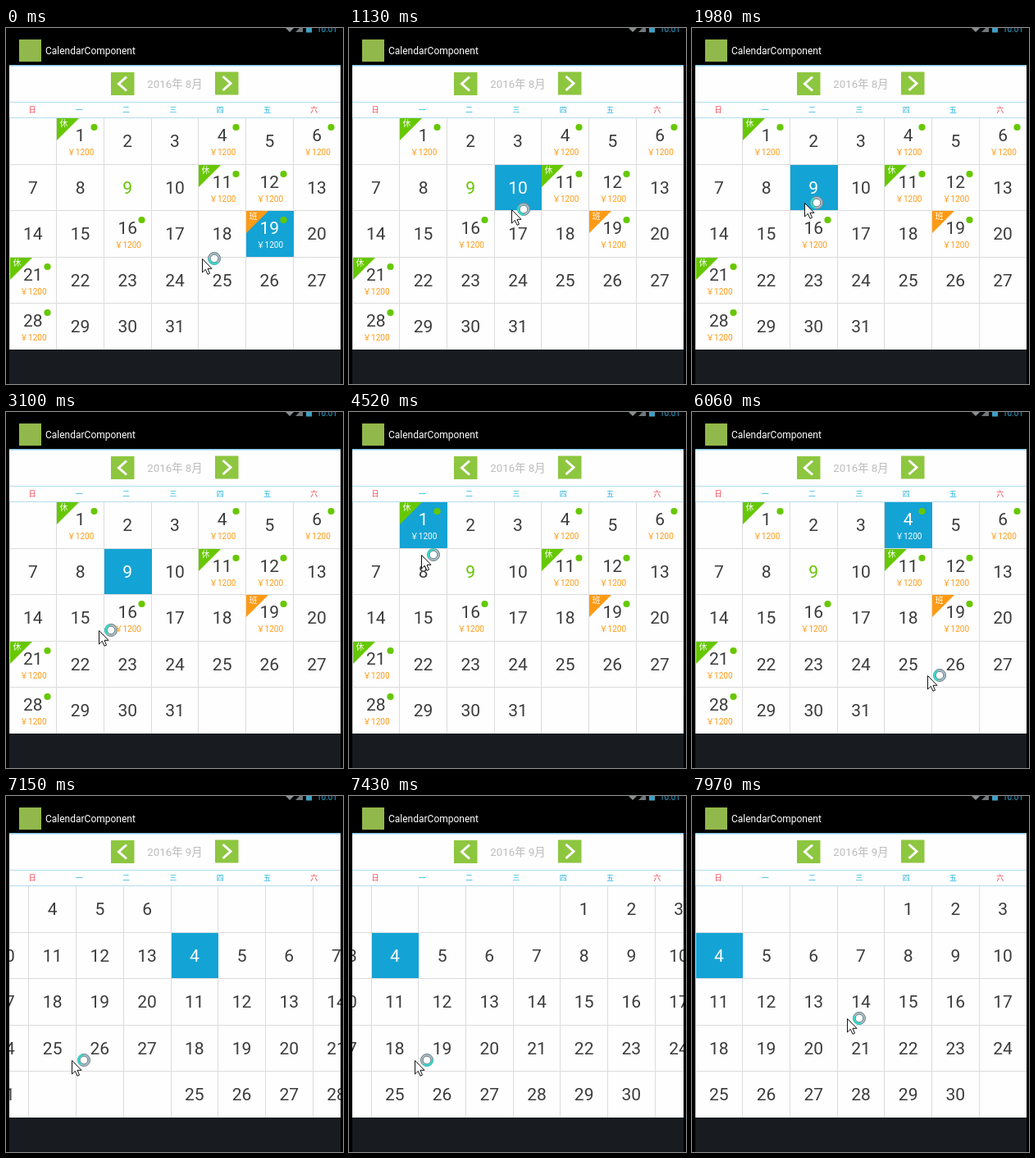
Write an HTML page that moves like this. It is 411 by 434 pixels and loops after 8000 ms.

```html
<!DOCTYPE html>
<html lang="zh">
<head>
<meta charset="utf-8">
<title>Calendar</title>
<style>
  html, body { margin: 0; width: 100%; height: 100%; overflow: hidden; background: #000; }
  svg { display: block; width: 411px; height: 434px; font-family: Roboto, "Noto Sans CJK SC", "Noto Sans CJK", sans-serif; }
  .mid { text-anchor: middle; }
  .line { stroke: #dcdcdc; fill: none; }
  .bg { fill: none; }
  .num { font-size: 21px; fill: #3c3c3c; }
  .price { font-size: 10px; fill: #ff9a14; }
  .tag { font-size: 10px; font-weight: 500; fill: #fff; }
  .today .num { fill: #66c400; }
  .marked .num { transform: translateY(-7px); }
  .plain .num { transform: none; }
  .plain .mark { display: none; }
  .sel .bg { fill: #14a3d5; }
  .sel .num, .sel .price { fill: #fff; }
</style>
</head>
<body>
<svg id="stage" viewBox="0 0 411 434">
  <defs><clipPath id="view"><rect x="4" y="109" width="404" height="283"/></clipPath></defs>
  <rect width="411" height="434"/>
  <rect x="4" y="392" width="404" height="42" fill="#181c20"/>
  <rect x="4" y="46" width="404" height="346" fill="#fefefe"/>
  <rect x="4" y="45" width="404" height="1.5" fill="#86cbea"/>

  <g id="status">
    <path d="M341 0H351L346 5Z" fill="#8a8f92"/>
    <path d="M353 5L358 0H362V5Z" fill="#70767a"/>
    <rect x="366" width="7" height="5.5" fill="#3f9fc4"/>
    <text x="379" y="4.5" font-size="10" fill="#33a5d3">10:01</text>
  </g>
  <rect x="16" y="14" width="27" height="27" fill="#91b84b"/>
  <text x="48" y="32" font-size="12" fill="#fff">CalendarComponent</text>

  <g fill="#8dc63f">
    <rect x="128" y="54" width="28.5" height="28"/>
    <rect x="255" y="53.5" width="28.5" height="28"/>
  </g>
  <path d="M147 59.5L137.5 68L147 76.5M264.5 59L274 67.5L264.5 76" fill="none" stroke="#fff" stroke-width="3"/>
  <text id="month" class="mid" x="206" y="73" font-size="13.3" fill="#bcbcbc"></text>
  <path d="M4 90.5H408" stroke="#b5dcf0"/>
  <g id="week" class="mid" font-size="9"></g>

  <g clip-path="url(#view)">
    <g id="aug"></g>
    <g id="sep"></g>
  </g>
  <path d="M4 109.5H408" stroke="#b5dcf0"/>

  <g id="cursor">
    <path d="M.5 .5V17L4.300 13.300L7 19.300L9.500 18.200L7 12.300H12Z" fill="#fff" stroke="#111"/>
    <g transform="translate(15 0)">
      <circle r="6.300" fill="#fff" stroke="#a9bfc7" stroke-width="3.200"/>
      <circle r="7.500" fill="none" stroke="#66757c" stroke-width=".8"/>
      <circle r="4.800" fill="none" stroke="#586970" stroke-width=".8"/>
      <path id="glow" d="M-6.300 0A6.300 6.300 0 0 0 4.500 4.500" fill="none" stroke="#35d6c8" stroke-width="2.600"/>
    </g>
  </g>
</svg>
<script>
const $ = id => document.getElementById(id);
const LOOP = 8000, PAGE = 404;
const colX = c => 4 + Math.floor(c * 57.7);
const rowY = r => Math.round(109 + r * 56.6);

function add(parent, tag, attrs, text) {
  const el = document.createElementNS('http://www.w3.org/2000/svg', tag);
  for (const k in attrs) el.setAttribute(k, attrs[k]);
  if (text !== undefined) el.textContent = text;
  parent.append(el);
  return el;
}

[...'日一二三四五六'].forEach((d, i) => add($('week'), 'text',
  { x: 32 + i * 57.3, y: 102.5, fill: i % 6 ? '#22b4e0' : '#f0414e' }, d));

function buildPage(page, first, days, priced = [], tags = {}) {
  const cells = [];
  for (let day = 1; day <= days; day++) {
    const n = first + day - 1, c = n % 7, r = Math.floor(n / 7);
    const x = colX(c), y = rowY(r), mid = 4 + 57.7 * (c + .5);
    const cell = cells[day] = add(page, 'g', {});
    add(cell, 'rect', { class: 'bg', x: x + 1, y: y + 1, width: colX(c + 1) - x, height: rowY(r + 1) - y - 1 });
    if (tags[day]) {
      const mark = add(cell, 'g', { class: 'mark' });
      add(mark, 'path', { d: `M${x + 1} ${y + 1}h27l-27 27z`, fill: tags[day] === '休' ? '#66c800' : '#ff9a14' });
      add(mark, 'text', { class: 'tag mid', x: x + 9.5, y: y + 10.5 }, tags[day]);
    }
    add(cell, 'text', { class: 'num mid', x: mid, y: y + 36.3 }, day);
    if (priced.includes(day)) {
      cell.classList.add('marked');
      add(cell, 'text', { class: 'price mark mid', x: mid + .5, y: y + 46.3 }, '￥1200');
      add(cell, 'circle', { class: 'mark', cx: x + 46.5, cy: y + 12, r: 4.1, fill: '#66c800' });
    }
  }
  let d = '';
  for (let c = 0; c < 7; c++) d += `M${colX(c) + .5} 109V392`;
  for (let r = 1; r < 6; r++) d += `M4 ${rowY(r) + .5}H408`;
  page.prepend(add(page, 'path', { class: 'line', d }));
  return cells;
}

const aug = buildPage($('aug'), 1, 31, [1, 4, 6, 11, 12, 16, 19, 21, 28],
  { 1: '休', 11: '休', 19: '班', 21: '休' });
const sep = buildPage($('sep'), 4, 30);
aug[9].classList.add('today');

// page offset at each step of the swipe; the finger lets go at RELEASE
const swipe = [12, 60, 120, 175, 207, 290, 350, 381], RELEASE = 207;
const SWIPE = 6460, FLIP = 7130, SETTLED = 7580;

// start, end, number of steps, evenly timed waypoints of the pointer
const moves = [
  [0, 0, 1, [[239, 281]]],
  [150, 820, 6, [[236, 276], [197, 197]]],
  [1130, 1670, 5, [[198, 221], [140, 195]]],
  [1980, 2540, 5, [[137, 213], [115, 266]]],
  [3100, 4090, 8, [[113, 266], [93, 142]]],
  [4520, 5210, 6, [[88, 174], [150, 238], [235, 215], [285, 142]]],
  [5520, 6060, 5, [[284, 168], [287, 321]]],
  [SWIPE, 7430, 8, swipe.map(o => [287 - Math.min(o, RELEASE), 321.5])],
  [SETTLED, 7970, 4, [[95, 318], [189, 271]]]
];
const picks = [[0, 19], [1130, 10], [1980, 9], [4520, 1], [5520, 4]];
const lastBefore = (list, t) => list.filter(e => e[0] <= t).pop();

function along(points, f) {
  const p = f * (points.length - 1), i = Math.min(Math.floor(p), Math.max(points.length - 2, 0));
  const a = points[i], b = points[i + 1] || a;
  return a.map((v, k) => v + (b[k] - v) * (p - i));
}

function render(t) {
  const move = lastBefore(moves, t), [start, end, n, points] = move;
  const step = n > 1 ? Math.min(n - 1, Math.floor((t - start) / (end - start) * (n - 1) + 1e-6)) : 0;
  const [x, y] = along(points, n > 1 ? step / (n - 1) : 0);
  $('cursor').setAttribute('transform', `translate(${Math.round(x)} ${Math.round(y)})`);
  $('glow').setAttribute('transform', `rotate(${step * 75 + moves.indexOf(move) * 20})`);

  const offset = t >= SETTLED ? PAGE : t >= SWIPE ? swipe[step] : 0;
  $('aug').setAttribute('transform', `translate(${-offset} 0)`);
  $('sep').setAttribute('transform', `translate(${PAGE - offset} 0)`);

  const flipped = t >= FLIP, day = lastBefore(picks, t)[1];
  $('month').textContent = `2016年 ${flipped ? 9 : 8}月`;
  $('aug').classList.toggle('plain', flipped);
  aug.forEach((c, i) => c.classList.toggle('sel', !flipped && i === day));
  sep.forEach((c, i) => c.classList.toggle('sel', flipped && i === day));
}

const t0 = performance.now();
function tick() {
  render((performance.now() - t0) % LOOP);
  requestAnimationFrame(tick);
}
tick();
</script>
</body>
</html>
```
